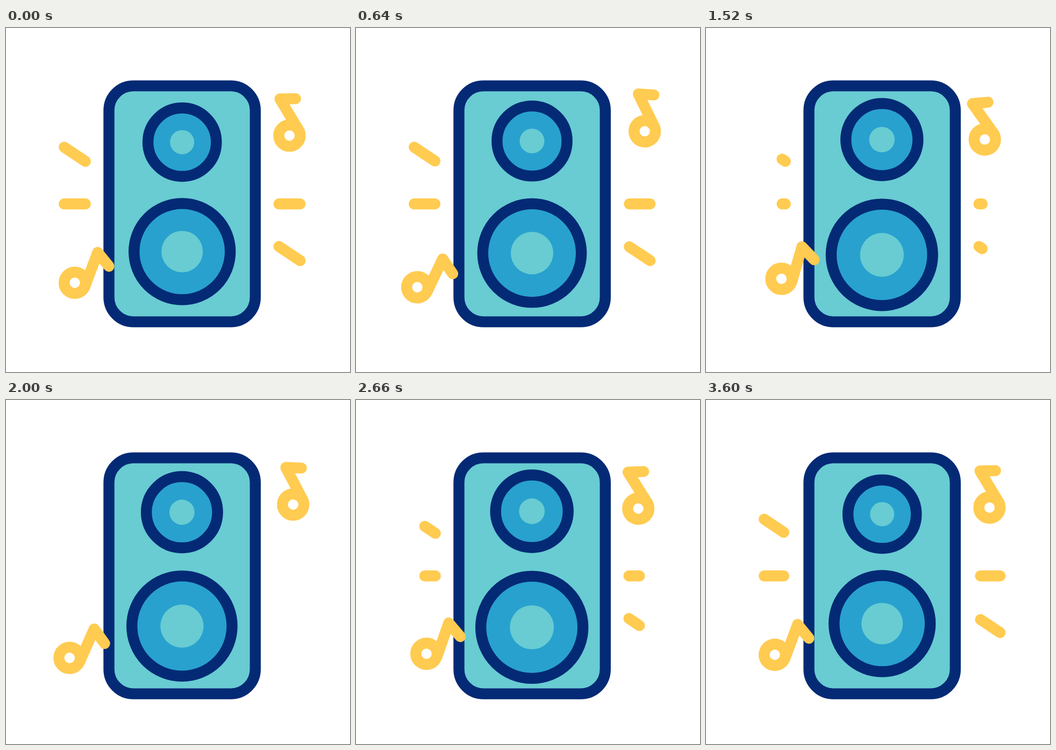
An HTML page with a canvas for the animation above (3.62 s loop, 640 px wide and 640 px high).

```html
<!DOCTYPE html>
<html lang="en">
<head>
<meta charset="utf-8">
<title>Speaker</title>
<style>
  html, body { margin: 0; height: 100%; overflow: hidden; background: #fff; }
  canvas { display: block; width: 100vmin; height: 100vmin; }
</style>
</head>
<body>
<canvas id="stage" width="640" height="640"></canvas>
<script>
const ctx = document.getElementById('stage').getContext('2d');
const NAVY = '#042a75', TEAL = '#68ccd2', BLUE = '#28a1ce', YELLOW = '#ffcb50';
const CX = 327.7, CY = 327.3;

// Times are counted in steps of 20 ms
const STEP = 20, STEPS = 181, END = 180;
const BEAT = 27, BEATS = 6, PULSE_START = 13.4;
const RAY_TIME = 12, FIRST_RAY = 19, LAST_RAY = 166;
const SWING_IN = 30, SWING_HALF = 40;

const clamp = u => Math.min(1, Math.max(0, u));
const smooth = u => (u = clamp(u), u * u * (3 - 2 * u));
const easeOut = u => 1 - (1 - u) ** 2;
const lerp = (a, b, u) => a + (b - a) * u;

// Notes start at rest, sway between 1 and -1, and come back to rest
function swingAt(n) {
  if (n < SWING_IN) return smooth(n / SWING_IN);
  if (n > END - SWING_IN) return -smooth((END - n) / SWING_IN);
  const turn = (n - SWING_IN) / SWING_HALF % 2;
  return 1 - 2 * smooth(1 - Math.abs(turn - 1));
}

// Each beat rises and falls, both times fast at first
function pulseAt(n) {
  const t = n - PULSE_START;
  if (t < 0 || t > BEAT * BEATS) return 0;
  const half = t % BEAT / BEAT * 2;
  return half < 1 ? easeOut(half) : 1 - easeOut(half - 1);
}

// Rays are fully drawn where the loop closes
function rayAge(n) {
  if (n < FIRST_RAY) return n + RAY_TIME;
  if (n >= LAST_RAY) return n - LAST_RAY;
  return Math.min(n - FIRST_RAY, LAST_RAY - RAY_TIME - FIRST_RAY - 1) % BEAT;
}

function disc(x, y, r, fill, stroke) {
  ctx.beginPath();
  ctx.arc(x, y, r, 0, 2 * Math.PI);
  if (fill) { ctx.fillStyle = fill; ctx.fill(); }
  if (stroke) { ctx.strokeStyle = stroke; ctx.stroke(); }
}

function line(...points) {
  ctx.beginPath();
  for (let i = 0; i < points.length; i += 2) ctx.lineTo(points[i], points[i + 1]);
  ctx.strokeStyle = YELLOW;
  ctx.stroke();
}

function cabinet() {
  ctx.beginPath();
  ctx.roundRect(191.5, 107.6, 272.3, 439, 45.5);
  ctx.fillStyle = TEAL;
  ctx.fill();
  ctx.strokeStyle = NAVY;
  ctx.stroke();
}

function cone(y, r, core, shift, pulse) {
  const x = CX - .5 * pulse, scale = 1 + .063 * pulse;
  disc(x, y + shift * pulse, r * scale, BLUE, NAVY);
  disc(x, y + shift * pulse, core * scale, TEAL);
}

function rays(age) {
  const head = smooth(age / RAY_TIME), tail = smooth(age / RAY_TIME - 1);
  if (head <= tail) return;
  for (const side of [-1, 1])
    for (const tilt of [0, 1]) {
      const point = u => [CX + side * lerp(180, 219.5, u), CY + side * tilt * lerp(79.2, 105.5, u)];
      line(...point(tail), ...point(head));
    }
}

function note(x, y, dx, dy, swing, ...stem) {
  ctx.save();
  ctx.translate(x + dx * swing, y + dy * swing);
  ctx.rotate(swing * 5 * Math.PI / 180);
  disc(0, 0, 19.9, null, YELLOW);
  line(...stem);
  ctx.restore();
}

function draw() {
  const n = Math.floor(performance.now() / STEP) % STEPS;
  const pulse = pulseAt(n), swing = swingAt(n);
  ctx.fillStyle = '#fff';
  ctx.fillRect(0, 0, 640, 640);
  ctx.lineWidth = 20.4;
  ctx.lineCap = ctx.lineJoin = 'round';
  cabinet();
  cone(212.4, 63.6, 22.5, -5.5, pulse);
  cone(416, 89.5, 38.6, 7, pulse);
  rays(rayAge(n));
  note(128, 474, -14.1, 8.4, swing, 19, 6.5, 42.5, -56.5, 63.5, -30.7);
  note(527.4, 200.2, 9.9, -8.2, swing, 17.3, -10, -17.8, -68.2, 11.3, -68.7);
  requestAnimationFrame(draw);
}
draw();
</script>
</body>
</html>
```
